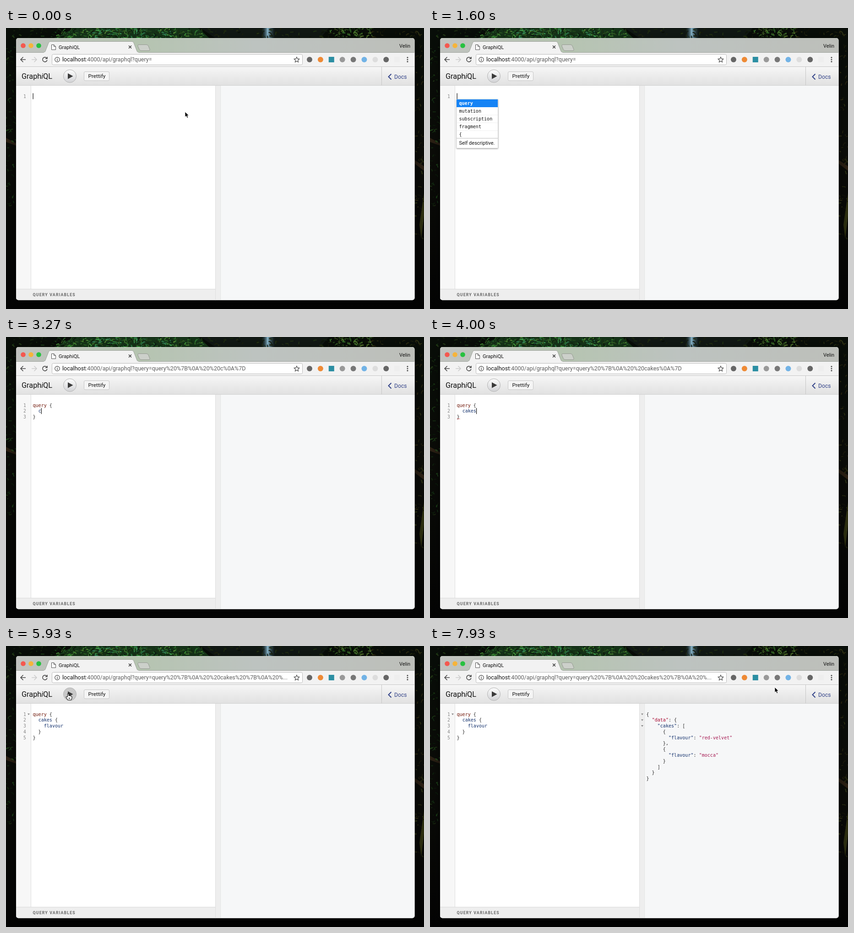
Write an HTML page that moves like this. It is 913x614 px and loops after 8000 ms.

```html
<!DOCTYPE html>
<html lang="en">
<head>
<meta charset="utf-8">
<title>Query editor</title>
<style>
  html, body { margin: 0; width: 100%; height: 100%; overflow: hidden; background: #050807; }
  svg { display: block; width: 913px; height: 614px; }
  text { white-space: pre; font-family: Roboto, sans-serif; fill: #111; }
  .code, .code text { font-family: "DejaVu Sans Mono", monospace; font-size: 10.07px; fill: #2a2a2a; }
  .code .num { fill: #858585; font-size: 9.6px; }
  .code .keyword { fill: #6f1608; }
  .code .field { fill: #12306c; }
  .code .def { fill: #a8062f; }
  .code .string { fill: #a61a52; }
  .fold { fill: #888; }
</style>
</head>
<body>
<svg viewBox="0 0 913 614">
  <defs>
    <linearGradient id="strip">
      <stop offset="0" stop-color="#c1c3c0"/><stop offset=".3" stop-color="#b5c4b0"/>
      <stop offset=".6" stop-color="#bdc3c0"/><stop offset="1" stop-color="#bdbfba"/>
    </linearGradient>
    <linearGradient id="bar" x2="0" y2="1">
      <stop stop-color="#f6f6f6"/><stop offset="1" stop-color="#e1e1e1"/>
    </linearGradient>
    <linearGradient id="button" x2="0" y2="1">
      <stop stop-color="#fdfdfd"/><stop offset="1" stop-color="#d2d3d6"/>
    </linearGradient>
    <linearGradient id="forest" x2="0" y2="1">
      <stop stop-color="#080d08"/><stop offset=".45" stop-color="#0b0c08"/><stop offset="1" stop-color="#040404"/>
    </linearGradient>
    <linearGradient id="fall">
      <stop stop-color="#193039" stop-opacity="0"/><stop offset=".45" stop-color="#87b4c9"/>
      <stop offset="1" stop-color="#193039" stop-opacity="0"/>
    </linearGradient>
    <filter id="soft" x="-10%" y="-10%" width="120%" height="125%"><feGaussianBlur stdDeviation="9"/></filter>
    <filter id="lift" x="-10%" y="-10%" width="125%" height="125%">
      <feDropShadow dx="0" dy="1" stdDeviation="1.5" flood-opacity=".45"/>
    </filter>
    <clipPath id="window"><rect x="22" y="22" width="870.5" height="572.5" rx="5"/></clipPath>
  </defs>

  <rect width="913" height="614" fill="url(#forest)"/>
  <path d="M105 22L150 0h270l24 22z" fill="#153218"/>
  <path d="M425 0h280l-20 24H460z" fill="#101713"/>
  <path d="M0 240l22 12v5L0 249zM892 288l21 14v10l-21-16z" fill="#2b2014"/>
  <path d="M903 430l10-70v50l-6 50z" fill="#2c2e10"/>
  <rect x="558" width="30" height="24" fill="url(#fall)"/>
  <rect x="20" y="30" width="875" height="574" rx="8" fill="#000" opacity=".5" filter="url(#soft)"/>
  <g id="foliage" fill="none"/>

  <g clip-path="url(#window)">
    <rect x="22" y="22" width="871" height="573" fill="#fff"/>
    <rect x="22" y="22" width="871" height="32" fill="url(#strip)"/>
    <path d="M22 22.500h871" stroke="#d5d9d2"/>
    <circle cx="37.500" cy="38.500" r="5.300" fill="#f4584f"/>
    <circle cx="54.500" cy="38.500" r="5.300" fill="#f6b43a"/>
    <circle cx="71.500" cy="38.500" r="5.300" fill="#27c13f"/>
    <rect x="22" y="53" width="871" height="32" fill="#f2f2f2"/>
    <path d="M22 53.500H82q3 0 4-3l7-18q1-3 4-3H275q3 0 4 3l7 18q1 3 4 3H893" fill="#f2f2f2" stroke="#9da19b"/>
    <path d="M83 54H289" stroke="#f2f2f2" stroke-width="2"/>
    <path d="M290 36.500h17q3 0 4 3l3 7q1 3-2 3h-17q-3 0-4-3l-3-7q-1-3 2-3z" fill="#ccd0ca" stroke="#959992"/>
    <path d="M99.500 36.500h5l4 4v7h-9zM104.500 36.500v4h4" fill="#fff" stroke="#555"/>
    <text x="115" y="45.500" font-size="11.2">GraphiQL</text>
    <path d="M268 38.500l6 6m0-6l-6 6" stroke="#333" stroke-width="1.400"/>
    <text x="883" y="42.700" font-size="11" text-anchor="end">Velin</text>

    <g fill="none" stroke="#4a4a4a" stroke-width="1.600">
      <path d="M43 69H32m5.500-5.500L32 69l5.500 5.500"/>
      <path d="M56 69h11m-5.500-5.500L67 69l-5.500 5.500" stroke="#ccc"/>
      <path d="M89 66a5 5 0 1 0 .8 4M90 63v4h-4"/>
    </g>
    <rect x="100.500" y="57.500" width="547" height="23" rx="3" fill="#fff" stroke="#b9b9b9"/>
    <circle cx="112" cy="69" r="5.200" fill="none" stroke="#4a4a4a" stroke-width="1.200"/>
    <path d="M112 68v4m0-6.500v1.300" stroke="#4a4a4a" stroke-width="1.400"/>
    <text x="123" y="73.200" font-size="12.55">localhost<tspan id="address" fill="#5c5c5c"></tspan></text>
    <path d="M635 63.500l1.700 3.700 4 .5-3 2.800.8 4-3.500-2-3.500 2 .8-4-3-2.800 4-.5z" fill="none" stroke="#4a4a4a" stroke-width="1.200"/>
    <g id="extensions"/>
    <g fill="#4a4a4a"><circle cx="877" cy="64.500" r="1.500"/><circle cx="877" cy="69" r="1.500"/><circle cx="877" cy="73.500" r="1.500"/></g>
    <path d="M22 84.500h871" stroke="#c6c6c6"/>

    <rect x="22" y="85" width="871" height="40" fill="url(#bar)"/>
    <path d="M22 125.500h871" stroke="#d0d0d0"/>
    <text x="34" y="110.700" font-size="16.300">Graph<tspan font-style="italic">i</tspan>QL</text>
    <circle id="play" cx="139.500" cy="105.200" r="14" stroke="#b0b0b0"/>
    <path d="M135 99l11.500 6.200L135 111.500z" fill="#3a3a3a"/>
    <rect x="170.500" y="95.500" width="55" height="19.500" rx="2.500" fill="#f5f5f5" stroke="#c5c5c5"/>
    <text x="179.500" y="109" font-size="11.800">Prettify</text>
    <path d="M820.500 85v40" stroke="#c6c6c6"/>
    <path d="M841.500 100.500l-6 6 6 6" fill="none" stroke="#35458a" stroke-width="2"/>
    <text x="848" y="110.800" font-size="12.200" style="fill:#35458a">Docs</text>

    <rect x="22" y="126" width="32.500" height="444" fill="#f7f7f7"/>
    <path d="M54.500 126v444" stroke="#ddd"/>
    <rect x="457" y="126" width="12" height="469" fill="#eee"/>
    <path d="M457.500 126v469M469 126v469" stroke="#dedede"/>
    <rect x="469.500" y="126" width="424" height="469" fill="#f6f7f8"/>
    <rect x="22" y="570" width="435" height="25" fill="#eee"/>
    <path d="M22 570.500h435" stroke="#d9d9d9"/>
    <text x="58.500" y="586" font-size="8.800" font-weight="700" letter-spacing="1.15" style="fill:#666">QUERY VARIABLES</text>

    <g class="code">
      <g id="editor"/>
      <path id="lint" d="M59 179.500l1.500-1.500 1.500 1.500 1.500-1.500 1.500 1.500" fill="none" stroke="#c33"/>
      <path id="editorFold" class="fold" d="M47 147.500h5l-2.500 3.500z"/>
      <rect id="caret" width="1.200" height="13" fill="#111"/>
      <g id="result"/>
    </g>

    <g id="hints" class="code">
      <rect x="58" y="156" width="90.500" height="106.500" fill="#fff" stroke="#bbb" stroke-width=".5" filter="url(#lift)"/>
      <rect x="58" y="156" width="90" height="17" fill="#1583f5"/>
      <path d="M58 190h90M58 207h90M58 224h90" stroke="#f0f0f0"/>
      <path d="M58 241h90" stroke="#bbb"/>
      <text x="63.500" y="255.200" style="font:11px Roboto,sans-serif;fill:#111">Self descriptive.</text>
    </g>
  </g>

  <g id="mouse">
    <path id="arrow" d="M0 0v11.500l2.700-2.300 1.900 4.300 2.200-1-1.900-4.100h3.500z" fill="#000" stroke="#fff" stroke-width=".9"/>
    <g id="hand" stroke="#111" stroke-width="1.100">
      <path d="M-1.500 7V1q1.300-2.200 2.600 0v3.500q2-1 2.600.5 2-.8 2.400.8 1.800-.4 1.800 1.400v2.800l-1.600 4H-1l-3.700-5.500q-.6-2.200 1.400-1.800z" fill="#fff"/>
      <path d="M1.500 9v2.500m2-2.500v2.500"/>
    </g>
    <g id="beam" fill="none">
      <path d="M-3-7q3 0 3 2v10q0 2-3 2M3-7Q0-7 0-5M3 7Q0 7 0 5M-2 2h4" stroke="#fff" stroke-width="2.600"/>
      <path d="M-3-7q3 0 3 2v10q0 2-3 2M3-7Q0-7 0-5M3 7Q0 7 0 5M-2 2h4" stroke="#222" stroke-width="1.200"/>
    </g>
  </g>
</svg>
<script>
const LOOP = 8000, TOP = 152.6, PITCH = 12.77, CHAR = 6.06;
const $ = id => document.getElementById(id);
const show = (id, on) => { $(id).style.display = on ? '' : 'none'; };
const span = (cls, s) => `<tspan class="${cls}">${s}</tspan>`;
const row = (x, i, s) => `<text x="${x}" y="${TOP + i * PITCH}">${s}</text>`;

// Desktop foliage: small seeded fronds
let seed = 11;
const rnd = () => (seed = seed * 16807 % 2147483647) / 2147483647;
function fronds(x, y, w, h, count, hue, light) {
  let out = '';
  for (let i = 0; i < count; i++) {
    const px = x + rnd() * w, py = y + rnd() * h, dx = rnd() * 16 - 8, dy = rnd() * 8 - 2;
    out += `<path d="M${px} ${py}q${dx / 2} ${-dy / 2} ${dx} ${dy}" stroke="hsl(${hue + rnd() * 30} 45% ${4 + rnd() * light}%)" stroke-width="${1 + rnd() * 1.5}"/>`;
  }
  return out;
}
$('foliage').innerHTML = fronds(110, 0, 325, 22, 260, 95, 36) + fronds(190, 0, 170, 22, 70, 125, 46) +
  fronds(705, 0, 95, 20, 80, 85, 32) + fronds(0, 40, 20, 350, 70, 95, 13) + fronds(0, 0, 110, 20, 25, 90, 12) +
  fronds(440, 0, 265, 20, 50, 70, 10) + fronds(800, 0, 113, 20, 25, 50, 10) + fronds(896, 30, 17, 430, 60, 45, 10);

const dots = ['#666', '#ee8a35', '#2c8fa3', '#999', '#777', '#72b3e6', '#ddd', '#666', '#eee'];
$('extensions').innerHTML = dots.map((c, i) =>
  i === 2 || i === 8 ? `<rect x="${657 + i * 23.9}" y="63" width="12" height="12" fill="${c}"/>`
    : `<circle cx="${663 + i * 23.9}" cy="69" r="6" fill="${c}"/>`).join('');

$('hints').insertAdjacentHTML('beforeend', ['query', 'mutation', 'subscription', 'fragment', '{'].map((s, i) =>
  `<text x="63.500" y="${168 + i * 17}" style="${i ? 'fill:#111' : 'fill:#fff;font-weight:700'}">${s}</text>`).join(''));

const answer = { data: { cakes: [{ flavour: 'red-velvet' }, { flavour: 'mocca' }] } };
$('result').innerHTML = JSON.stringify(answer, null, 2).split('\n').map((line, i) =>
  row(472.5, i, line.replace(/"[^"]+"(:?)/g, (s, colon) =>
    colon ? span(s === '"data":' ? 'def' : 'field', s.slice(0, -1)) + ':' : span('string', s)))).join('') +
  [0, 1, 2].map(i => `<path class="fold" d="M461 ${147.5 + i * PITCH}h5l-2.500 3.500z"/>`).join('');

// Editor contents over time; | is the caret
const edits = [[0, '|'], [1200, '|'], [2200, 'query|'], [2800, 'query |'], [2930, 'query {|}'], [3070, 'query {\n  |\n}']];
function type(start, gap, before, word, after) {
  for (let n = 1; n <= word.length; n++)
    edits.push([start + (n - 1) * gap, before + word.slice(0, n) + '|' + after]);
}
type(3270, 100, 'query {\n  ', 'cakes', '\n}');
edits.push([4200, 'query {\n  cakes |\n}'], [4330, 'query {\n  cakes {|}\n}'], [4470, 'query {\n  cakes {\n    |\n  }\n}']);
type(4600, 80, 'query {\n  cakes {\n    ', 'flavour', '\n  }\n}');

const path = [[0, 391, 183], [5250, 391, 183], [5750, 136, 104], [6200, 136, 104], [6900, 512, 249], [7100, 512, 249], [7800, 753, 90], [LOOP, 753, 90]];
function mouseAt(t) {
  const i = path.findIndex(p => p[0] > t);
  const [t0, x0, y0] = path[i - 1], [t1, x1, y1] = path[i];
  const k = (t - t0) / (t1 - t0), e = k * k * (3 - 2 * k);
  return [x0 + (x1 - x0) * e, y0 + (y1 - y0) * e];
}

let shown = null;
function drawEditor(marked) {
  if (marked === shown) return;
  shown = marked;
  const code = marked.replace('|', ''), lines = code.split('\n');
  const before = marked.split('|')[0].split('\n');
  $('editor').innerHTML = lines.map((line, i) =>
    `<text class="num" x="38" y="${TOP + i * PITCH}">${i + 1}</text>` +
    row(58.5, i, line.replace(/\w+/g, w => span(w === 'query' ? 'keyword' : 'field', w)))).join('');
  $('caret').setAttribute('x', 58.5 + before[before.length - 1].length * CHAR);
  $('caret').setAttribute('y', 142.5 + (before.length - 1) * PITCH);
  const encoded = encodeURIComponent(code);
  $('address').textContent = ':4000/api/graphql?query=' + (encoded.length > 41 ? encoded.slice(0, 38) + '...' : encoded);
  show('lint', lines.length === 3 && code.includes('cakes'));
  show('editorFold', lines.length === 5);
}

function draw(t) {
  const [keyTime, marked] = edits.filter(e => e[0] <= t).pop();
  const hasResult = t >= 6130, pressed = t >= 5850 && t < 6000;
  drawEditor(marked);
  show('caret', t < 5850 && (t - keyTime) % 1060 < 530);
  show('hints', t >= 1200 && t < 2200);
  show('result', hasResult);
  $('play').setAttribute('fill', pressed ? '#c9c9c9' : 'url(#button)');

  const [x, y] = mouseAt(t);
  const onPlay = Math.hypot(x - 139.5, y - 105) < 15;
  const lineCount = marked.split('\n').length;
  const onText = y > 137 && (x > 54 && x < 457 ? y < 146 + lineCount * PITCH : hasResult && x > 470 && y < 300);
  $('mouse').setAttribute('transform', `translate(${x} ${y})`);
  show('mouse', t < 1200 || t >= 5250);
  show('hand', onPlay);
  show('beam', onText);
  show('arrow', !onPlay && !onText);
}

let start;
function tick(now) {
  start ??= now;
  draw((now - start) % LOOP);
  requestAnimationFrame(tick);
}
draw(0);
requestAnimationFrame(tick);
</script>
</body>
</html>
```
